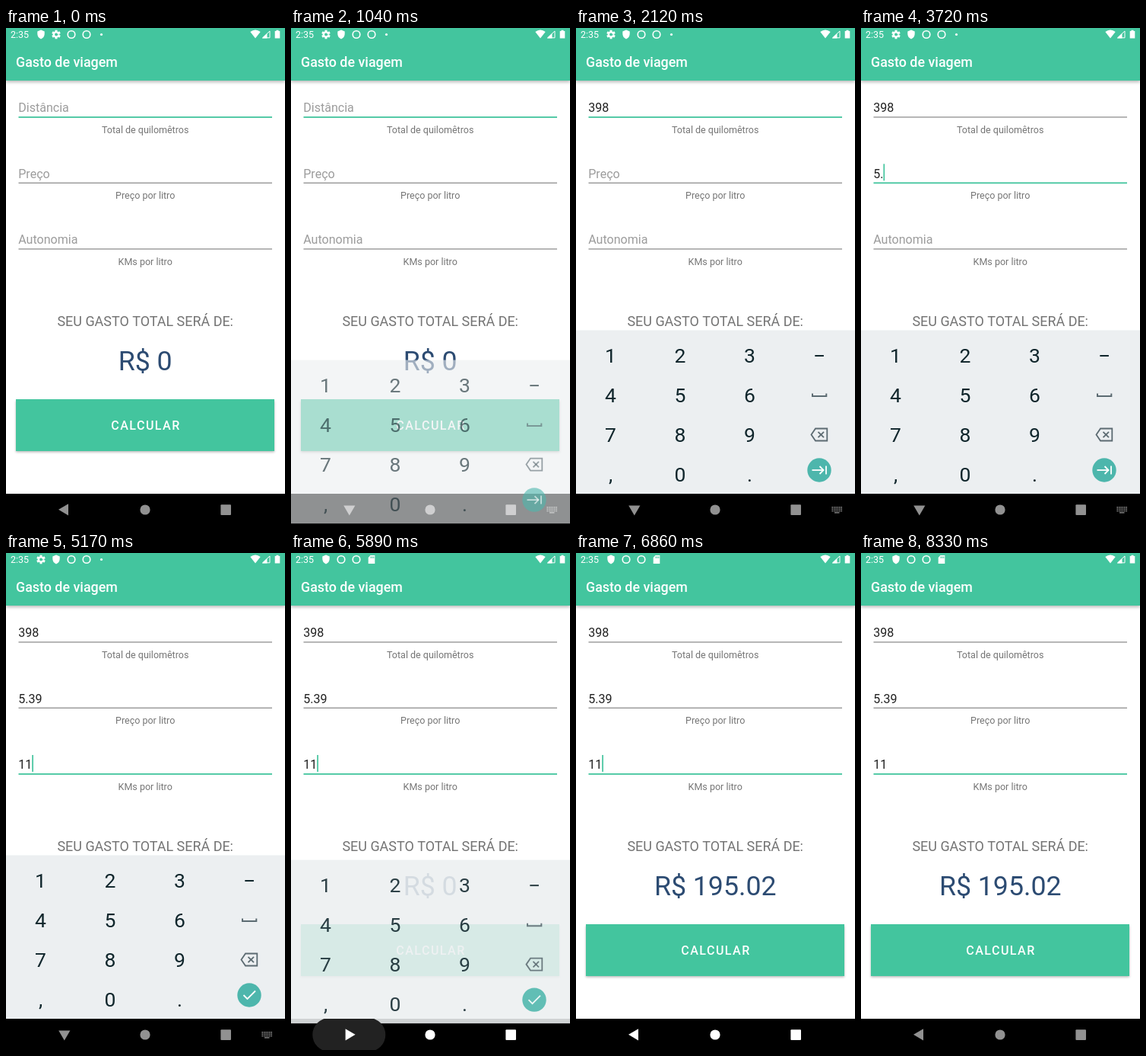
Animation of 367x652 px, one loop 8.36 s. Source, as an HTML page with a canvas:

```html
<!DOCTYPE html>
<html lang="pt">
<head>
<meta charset="utf-8">
<title>Gasto de viagem</title>
<style>
html, body { margin: 0; width: 100%; height: 100%; overflow: hidden; background: #fff; }
canvas { display: block; width: 367px; height: 652px; }
</style>
</head>
<body>
<canvas id="stage"></canvas>
<script>
const W = 367, H = 652, LOOP = 8360;
const GREEN = '#43c59e', KEY = '#10262c', ICON = '#5c6b72';
const canvas = document.getElementById('stage');
const g = canvas.getContext('2d');
const dpr = window.devicePixelRatio || 1;
canvas.width = W * dpr;
canvas.height = H * dpr;

const blinks = [270, 530, 800, 1040, 1370, 2120, 2370, 2700, 2960, 3450, 3720, 4000, 4140,
  4560, 4790, 5460, 5730, 6050, 6320, 6585, 6860, 7130, 7420, 7790, 8060, 8330];
const fields = [
  { y: 117, hint: 'Distância', help: 'Total de quilomêtros', text: '398', at: [1640, 1740, 1850] },
  { y: 203.3, hint: 'Preço', help: 'Preço por litro', text: '5.39', at: [3040, 3180, 4140, 4290] },
  { y: 290, hint: 'Autonomia', help: 'KMs por litro', text: '11', at: [5070, 5170] }
];

const ramp = (t, a, b) => Math.min(1, Math.max(0, (t - a) / (b - a)));
const mix = (a, b, p) => a + (b - a) * p;
const ease = p => p * p * (3 - 2 * p);
const passed = (times, t) => times.filter(x => x <= t).length;

function text(s, x, y, size, color, align = 'left', weight = 400, gap = 0) {
  g.font = `${weight} ${size}px Roboto, sans-serif`;
  g.letterSpacing = gap + 'px';
  g.textAlign = align;
  g.fillStyle = color;
  g.fillText(s, x, y);
}

function rect(x, y, w, h, color) {
  g.fillStyle = color;
  g.fillRect(x, y, w, h);
}

function disc(x, y, r, color) {
  g.fillStyle = color;
  g.beginPath();
  g.arc(x, y, r, 0, 7);
  g.fill();
}

function poly(points, closed = true) {
  g.beginPath();
  points.forEach(([x, y]) => g.lineTo(x, y));
  if (closed) g.closePath();
}

function stroke(points, color, width, closed = false) {
  poly(points, closed);
  g.strokeStyle = color;
  g.lineWidth = width;
  g.stroke();
}

function at(x, y, draw, scale = 1) {
  if (scale <= 0) return;
  g.save();
  g.translate(x, y);
  g.scale(scale, scale);
  draw();
  g.restore();
}

function shadowed(x, y, w, h, color, blur, dy, alpha) {
  g.save();
  g.shadowColor = `rgba(0,0,0,${alpha})`;
  g.shadowBlur = blur * dpr;
  g.shadowOffsetY = dy * dpr;
  rect(x, y, w, h, color);
  g.restore();
}

function shield() {
  g.fillStyle = '#fff';
  g.beginPath();
  g.moveTo(0, -6);
  g.lineTo(4.7, -4);
  g.lineTo(4.7, -0.5);
  g.quadraticCurveTo(4.4, 4, 0, 6);
  g.quadraticCurveTo(-4.4, 4, -4.7, -0.5);
  g.lineTo(-4.7, -4);
  g.fill();
}

function gear() {
  g.fillStyle = '#fff';
  for (let i = 0; i < 6; i++) {
    g.rotate(Math.PI / 3);
    g.fillRect(-1.5, -5.8, 3, 3);
  }
  g.beginPath();
  g.arc(0, 0, 4.3, 0, 7);
  g.arc(0, 0, 1.9, 0, 7, true);
  g.fill();
}

function ring() {
  g.strokeStyle = '#fff';
  g.lineWidth = 1.6;
  g.beginPath();
  g.arc(0, 0, 4.8, 0, 7);
  g.stroke();
}

function card() {
  g.fillStyle = '#fff';
  poly([[-1.5, -5.5], [4.3, -5.5], [4.3, 5.5], [-4.3, 5.5], [-4.3, -2.5]]);
  g.fill();
  for (let i = 0; i < 3; i++) rect(-1.5 + i * 1.9, -4, 1, 2.4, GREEN);
}

function statusBar(t) {
  text('2:35', 6, 13, 12.5, '#fff');
  const swap = ease(ramp(t, 700, 1000)), leave = ease(ramp(t, 5520, 5780));
  const dx = -20 * leave;
  at(mix(46, 66, swap) + dx, 8.5, shield);
  at(mix(66, 46, swap), 8.5, gear, 1 - leave);
  at(86 + dx, 8.5, ring);
  at(106 + dx, 8.5, ring);
  at(106, 8.5, card, ramp(leave, 0.5, 1));
  if (leave < 1) disc(125.5 + dx, 8.5, 1.6 * (1 - leave), '#fff');

  g.fillStyle = '#fff';
  g.beginPath();
  g.moveTo(328, 13.5);
  g.lineTo(321.3, 5);
  g.quadraticCurveTo(328, 0, 334.7, 5);
  g.fill();
  stroke([[337.5, 12.8], [347, 12.8], [347, 4]], '#fff', 1, true);
  poly([[337, 13.4], [343.5, 13.4], [343.5, 7]]);
  g.fill();
  rect(353.7, 4, 6.6, 9.5, '#fff');
  rect(355.5, 2.8, 3, 1.5, '#fff');
}

function field(f, i, t, focus, cursor) {
  const n = passed(f.at, t), typed = f.text.slice(0, n), base = f.y - 6.8;
  text(n ? typed : f.hint, 16.2, base, 16.07, n ? '#212121' : '#9c9c9c');
  const x = 16.2 + (n ? g.measureText(typed).width : 0);
  if (focus === i) {
    rect(16.5, f.y - 0.9, 333.5, 1.8, GREEN);
    if (cursor) rect(x, f.y - 25, 1.7, 22, GREEN);
  } else {
    rect(16.5, f.y - 0.6, 333.5, 1.1, '#7c7c7c');
  }
  text(f.help, 183.2, f.y + 20.5, 12.5, '#757575', 'center');
}

function page(t) {
  rect(0, 0, W, H, '#fff');
  shadowed(0, 0, W, 69, GREEN, 4, 1.5, 0.28);
  text('Gasto de viagem', 13, 51, 17.86, '#fff', 'left', 500);
  statusBar(t);

  const focus = t < 2410 ? 0 : t < 4790 ? 1 : 2;
  const cursor = passed(blinks, t) % 2 === 1;
  fields.forEach((f, i) => field(f, i, t, focus, cursor));

  text('SEU GASTO TOTAL SERÁ DE:', 183.2, 391, 17.95, '#737373', 'center');
  text(t < 6550 ? 'R$ 0' : 'R$ 195.02', 183.2, 448.5, 35.7, '#2c4b72', 'center');
  const press = Math.sin(Math.PI * ramp(t, 6490, 6580));
  shadowed(13, 487, 340, 68, GREEN, 3 + 4 * press, 1.5 + 2 * press, 0.28);
  if (press > 0) rect(13, 487, 340, 68, `rgba(255,255,255,${0.2 * press})`);
  text('CALCULAR', 184, 527.3, 16.07, '#fff', 'center', 500, 1.43);
}

function enterKey(t, alpha) {
  const done = ramp(t, 4790, 4870);
  disc(320, 580, 15.7, '#4db6ac');
  g.globalAlpha = alpha * (1 - done);
  stroke([[310.5, 580], [325.5, 580]], '#fff', 1.8);
  stroke([[320.5, 575], [325.5, 580], [320.5, 585]], '#fff', 1.8);
  stroke([[329, 574.5], [329, 585.5]], '#fff', 1.8);
  g.globalAlpha = alpha * done;
  stroke([[312.5, 580], [317.5, 585], [328, 574.5]], '#fff', 1.8);
}

function keyboard(t) {
  const rise = 1 - ramp(t, 980, 1140), fall = ramp(t, 5855, 5955);
  const hidden = rise > 0 ? rise * rise : fall * fall;
  if (hidden >= 1) return;
  const alpha = 1 - hidden;
  g.save();
  g.globalAlpha = alpha;
  g.translate(0, hidden * (rise > 0 ? 100 : 50));
  rect(0, 396.5, W, 214.5, '#eceff1');
  ['123', '456', '789', ',0.'].forEach((row, r) => [...row].forEach((c, i) =>
    text(c, 45.5 + 91.5 * i, 439 + 52 * r, 26.5, KEY, 'center')));
  rect(314.3, 429, 11.6, 2, KEY);
  stroke([[311, 479.5], [311, 483], [329.3, 483], [329.3, 479.5]], ICON, 2);
  stroke([[309.5, 533.5], [315, 525.5], [330.3, 525.5], [330.3, 541.5], [315, 541.5]], ICON, 1.8, true);
  stroke([[318.5, 529.8], [326, 537.2]], ICON, 1.8);
  stroke([[326, 529.8], [318.5, 537.2]], ICON, 1.8);
  enterKey(t, alpha);
  g.restore();
}

function backAngle(t) {
  if (t < 5800) return -Math.PI / 2 * ease(ramp(t, 900, 1030));
  return t < 5890
    ? -Math.PI / 2 * (1 + ramp(t, 5800, 5885))
    : -Math.PI * (1 + ramp(t, 5895, 5965));
}

function navIcons(t) {
  const ripple = ease(ramp(t, 5700, 5850)), fade = 1 - ramp(t, 5970, 6110);
  if (ripple > 0 && fade > 0) {
    g.save();
    g.beginPath();
    g.rect(0, 611, W, 41);
    g.clip();
    g.globalAlpha = fade;
    g.fillStyle = '#222';
    g.beginPath();
    const w = 96 * ripple;
    g.roundRect(76.3 - w / 2, 610, w, 44, Math.min(22, w / 2));
    g.fill();
    g.restore();
  }
  const bright = ramp(t, 5600, 5750) * (1 - ramp(t, 7030, 7850));
  g.save();
  g.globalAlpha = mix(0.57, 1, bright);
  at(76.8, 631.8, () => {
    g.rotate(backAngle(t));
    g.fillStyle = '#fff';
    poly([[-7.8, 0], [5.2, -7.6], [5.2, 7.6]]);
    g.fill();
  });
  disc(183, 632, 6.6, '#fff');
  g.beginPath();
  g.roundRect(282.4, 625.3, 13.6, 13.6, 1);
  g.fill();

  g.globalAlpha *= ramp(t, 900, 1030) * (1 - ramp(t, 5800, 5880));
  for (let r = 0; r < 3; r++)
    for (let i = 0; i < 6; i++) rect(336.5 + i * 2.4, 628 + r * 2.4, 1.5, 1.5, '#fff');
  rect(340, 635.2, 6.5, 1.3, '#fff');
  g.restore();
}

function frame(now) {
  const t = now % LOOP;
  g.setTransform(dpr, 0, 0, dpr, 0, 0);
  page(t);
  rect(0, 611, W, 41, '#000');
  keyboard(t);
  navIcons(t);
}

let start;
function tick(now) {
  start ??= now;
  frame(Math.max(0, now - start));
  requestAnimationFrame(tick);
}
frame(0);
requestAnimationFrame(tick);
</script>
</body>
</html>
```
